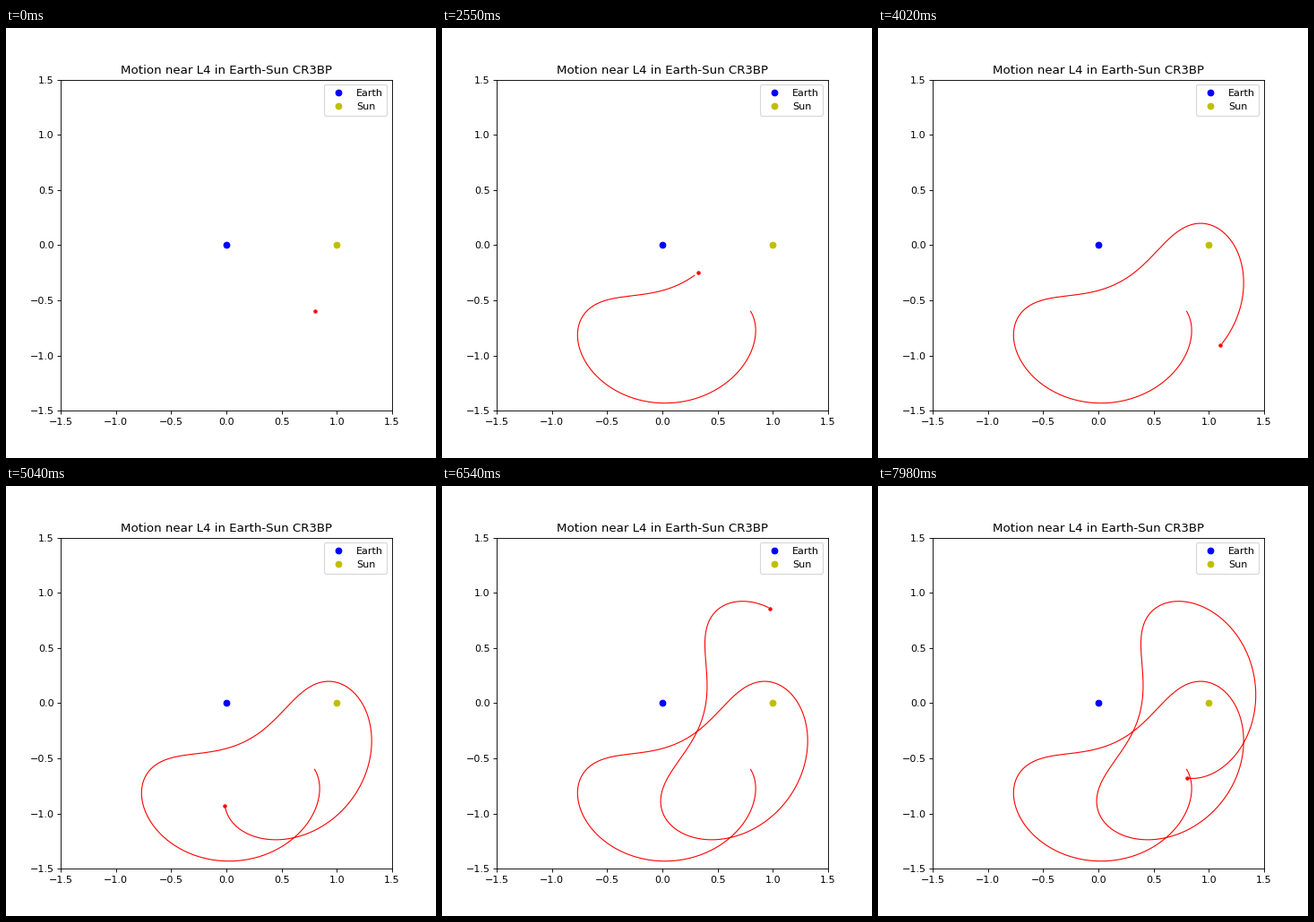
A matplotlib script that plays this animation: 480 by 480 pixels, repeating every 8 s.

```python
import numpy as np
import matplotlib.pyplot as plt
from matplotlib.animation import FuncAnimation

LOOP_MS = 8000
FRAMES = 267
SAMPLES_PER_FRAME = 2
STEP = 40 / 1499      # time between trajectory samples
SUBSTEPS = 8
MU = 3.04e-6          # mass ratio of the light body at (1, 0)


def rates(s):
    """Planar three-body equations of motion in the rotating frame."""
    x, y, vx, vy = s
    r1 = np.hypot(x, y) ** 3
    r2 = np.hypot(x - 1, y) ** 3
    ax = 2 * vy + x - (1 - MU) * x / r1 - MU * (x - 1) / r2
    ay = -2 * vx + y - (1 - MU) * y / r1 - MU * y / r2
    return np.array([vx, vy, ax, ay])


def rk4(s, h):
    k1 = rates(s)
    k2 = rates(s + h / 2 * k1)
    k3 = rates(s + h / 2 * k2)
    k4 = rates(s + h * k3)
    return s + h / 6 * (k1 + 2 * k2 + 2 * k3 + k4)


def trajectory(start, count):
    s = np.array(start)
    points = [s[:2]]
    for _ in range(count - 1):
        for _ in range(SUBSTEPS):
            s = rk4(s, STEP / SUBSTEPS)
        points.append(s[:2])
    return np.array(points).T


xs, ys = trajectory((0.8, -0.6, 0.3, -0.5), FRAMES * SAMPLES_PER_FRAME)

fig, ax = plt.subplots(figsize=(6, 6), dpi=80)
ax.set_aspect("equal")
ax.set_xlim(-1.5, 1.5)
ax.set_ylim(-1.5, 1.5)
ax.set_title("Motion near L4 in Earth-Sun CR3BP")
ax.plot(0, 0, "bo", label="Earth")
ax.plot(1, 0, "yo", label="Sun")
trail, = ax.plot([], [], "r-", lw=1)
dot, = ax.plot([], [], "r.", ms=6)
ax.legend(loc="upper right")


def update(frame):
    i = frame * SAMPLES_PER_FRAME
    trail.set_data(xs[:i], ys[:i])
    dot.set_data([xs[i]], [ys[i]])
    return trail, dot


anim = FuncAnimation(fig, update, frames=FRAMES, interval=LOOP_MS / FRAMES,
                     init_func=lambda: update(0), repeat=True, repeat_delay=0)
plt.show()
```
